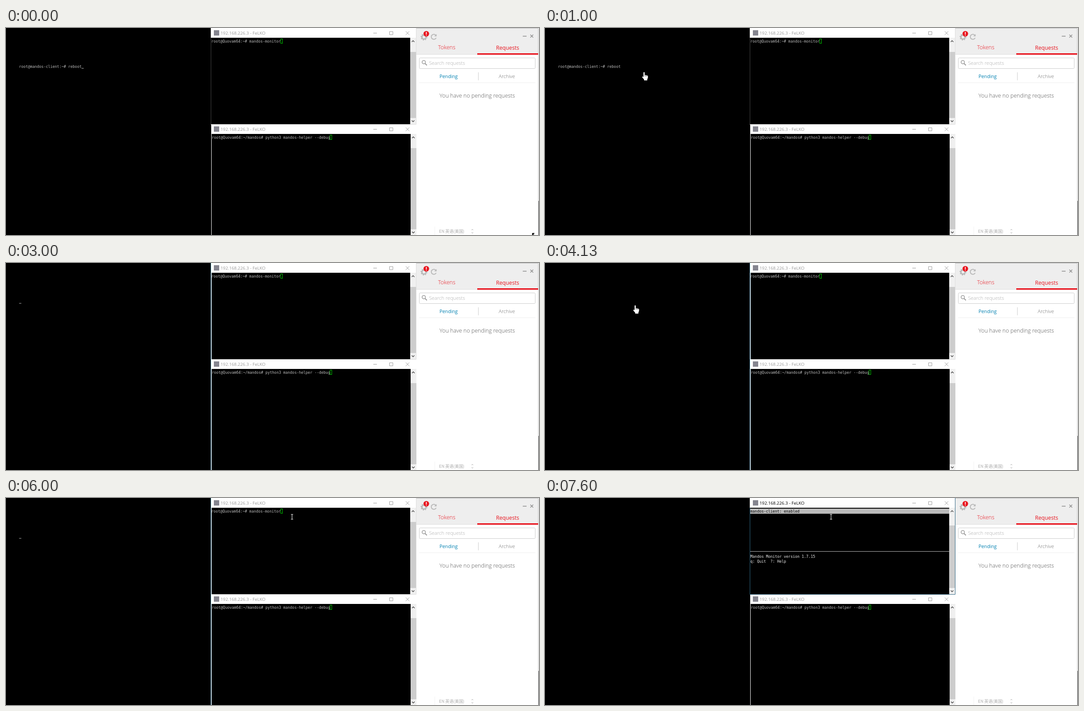
Animation, 1200 px wide and 467 px high, one loop 8000 ms. Source, as an HTML page:

```html
<!DOCTYPE html>
<html lang="en">
<head>
<meta charset="utf-8">
<title>Remote unlock demo</title>
<style>
  html, body { margin: 0; width: 100%; height: 100%; overflow: hidden; background: #000; }
  svg { display: block; width: 1200px; height: 467px; }
  text { white-space: pre; }
  .mono { font: 8.37px "DejaVu Sans Mono", monospace; fill: #bbb; }
  .bright { fill: #eee; }
  .title { font: 9.8px "Open Sans", "Noto Sans", sans-serif; fill: #999; }
  .ui { font: 300 12.5px "Open Sans", "Noto Sans", sans-serif; text-anchor: middle; }
  .small { font-size: 11.2px; }
  .lang { font: 300 9.2px "Noto Sans CJK SC", "Noto Sans CJK", sans-serif; fill: #aaa; }
  .btn { fill: none; stroke: #999; }
  .arrow { fill: none; stroke: #444; stroke-width: 1.4; }
  .edge { fill: none; stroke: #ddd; }
  .side { stroke: #444; }
  .caret { fill: none; stroke: #00c800; }
  .active .title { fill: #000; }
  .active .btn { stroke: #000; }
  .active .edge { stroke: #2f6683; }
  .active .caret { fill: #00d000; }
</style>
</head>
<body>
<svg viewBox="0 0 1200 467">
  <defs>
    <g id="buttons" class="btn">
      <path d="M827 11.5h8M863.5 8h7.5v7h-7.5zM900 7.5l8 8m0-8l-8 8"/>
    </g>
    <path id="up" class="arrow" d="M-3 1.5L0-1.5L3 1.5"/>
    <path id="down" class="arrow" d="M-3-1.5L0 1.5L3-1.5"/>
  </defs>
  <rect width="1200" height="467"/>

  <!-- client console -->
  <text id="reboot" class="mono" x="29.3" y="90">root@mandos-client:~# reboot</text>
  <rect id="blink" y="90.5" width="5" height="1" fill="#bbb"/>

  <!-- lower terminal -->
  <g>
    <rect x="462" y="217" width="462" height="250" fill="#fff"/>
    <rect x="463" y="239" width="448" height="228"/>
    <rect x="468" y="222" width="12" height="12" fill="#85858f"/>
    <text class="title" x="483" y="232">192.168.226.3 - FeLKO</text>
    <use href="#buttons" y="217"/>
    <text class="mono" x="463.2" y="249.7">root@Quovam64:~/mandos# python3 mandos-helper --debug</text>
    <rect class="caret" x="729.5" y="241.5" width="4" height="10"/>
    <rect x="911" y="239" width="13" height="228" fill="#f0f0f0"/>
    <rect x="911" y="271" width="13" height="183" fill="#cdcdcd"/>
    <use href="#up" x="917" y="247"/>
    <use href="#down" x="917" y="461"/>
  </g>

  <!-- upper terminal -->
  <g id="monitor">
    <rect x="461" width="463" height="218" fill="#fff"/>
    <rect x="462" y="22" width="448" height="195"/>
    <rect x="468" y="5" width="12" height="12" fill="#85858f"/>
    <text class="title" x="483" y="15">192.168.226.3 - FeLKO</text>
    <use href="#buttons"/>
    <g id="prompt">
      <text class="mono" x="462.3" y="32.7">root@Quovam64:~# mandos-monitor</text>
      <rect class="caret" x="618.5" y="24.5" width="4" height="10"/>
    </g>
    <g id="status">
      <rect x="462" y="24" width="448" height="11.5" fill="#bbb"/>
      <text class="mono" x="462.3" y="32.7" style="fill:#000">mandos-client: enabled</text>
      <rect x="462" y="120" width="448" height="1" fill="#bbb"/>
      <text class="mono bright" x="462.3" y="134.5">Mandos Monitor version 1.7.15</text>
      <text class="mono bright" x="462.3" y="145.7">q: Quit  ?: Help</text>
    </g>
    <rect x="910" y="22" width="13" height="195" fill="#f0f0f0"/>
    <rect id="thumb" x="910" width="13" fill="#cdcdcd"/>
    <use href="#up" x="916.5" y="30"/>
    <use href="#down" x="916.5" y="210"/>
    <path class="edge" d="M461 217.5H923.5V0"/>
    <path class="edge side" d="M461.5 22V217"/>
  </g>
  <g id="focus">
    <rect x="461" width="1" height="467" fill="#8fcdf0"/>
    <rect x="462" width="1" height="467" fill="#fff"/>
  </g>

  <!-- token panel -->
  <g>
    <rect x="924" width="276" height="467" fill="#fff"/>
    <rect x="924" y="1" width="274" height="59" fill="#eee"/>
    <path d="M924 59.5H1198" stroke="#ddd"/>
    <path d="M924 .5H1198.5V467" fill="none" stroke="#bbb"/>
    <path d="M1199.5 390V467" stroke="#555"/>
    <g fill="none" stroke="#b8b8b8">
      <circle cx="941" cy="20.5" r="4.6" stroke-width="3"/>
      <circle cx="941" cy="20.5" r="6.6" stroke-width="2.2" stroke-dasharray="2.6 2.58"/>
      <path d="M967.4 16A5.7 5.7 0 1 0 968.4 22.3" stroke-width="2"/>
      <path d="M969.5 13.5v5.3h-5.3z" fill="#b8b8b8" stroke="none"/>
    </g>
    <circle cx="946.3" cy="13" r="6.3" fill="#e8151f"/>
    <path d="M946.3 9v5M946.3 15.2v1.7" stroke="#fff" stroke-width="1.8"/>
    <path d="M1163.5 18.5h8.5M1180.5 15l6.5 6.5m0-6.5l-6.5 6.5" stroke="#888" stroke-width="1.4"/>
    <text class="ui" x="992.3" y="48.3" fill="#e8151f">Tokens</text>
    <text class="ui" x="1129.3" y="48.5" fill="#e8151f" style="font-weight:400;font-size:12.2px">Requests</text>
    <rect x="1061" y="57" width="137" height="3.3" fill="#e8151f"/>
    <rect x="930.5" y="67.5" width="261" height="24" rx="2" fill="#fff" stroke="#ccc"/>
    <g fill="none" stroke="#999">
      <circle cx="940.6" cy="77" r="3.8" stroke-width="1.5"/>
      <path d="M943.4 80l4.2 4.2" stroke-width="2"/>
    </g>
    <text class="ui small" x="993" y="83.4" fill="#aaa">Search requests</text>
    <text class="ui small" x="996.5" y="113" fill="#0080b0" style="font-weight:400;font-size:10.8px">Pending</text>
    <text class="ui small" x="1127.5" y="113" fill="#666">Archive</text>
    <path d="M1063.5 100V118" stroke="#ccc"/>
    <path d="M930 123.5H1192" stroke="#eee"/>
    <text class="ui" x="1061" y="156.5" fill="#555">You have no pending requests</text>
    <path d="M965.5 448V467" stroke="#f2f2f2"/>
    <text class="lang" x="975" y="461.5">EN</text>
    <text class="lang" x="989" y="461.5">英语(美国)</text>
    <path d="M1048 456l2-2 2 2M1048 461l2 2 2-2" fill="none" stroke="#aaa"/>
  </g>

  <!-- pointers, each with its hot spot at 0,0 -->
  <g id="pointers">
    <g data-kind="hand" transform="translate(-4.8)">
      <path d="M3.5 1.3a1.3 1.3 0 0 1 2.6 0V6.2l6 1.3q1.4.4 1.4 1.9v3.2l-1.5 3.9v2.3H4.9v-2L.7 11.8q-.6-1.5.7-1.9 1-.2 2.1 1.3z" fill="#fff"/>
      <path d="M6.2 6.5v3.3M8.6 7v3M11 7.5v2.7" stroke="#000" stroke-width=".6"/>
    </g>
    <path data-kind="beam" d="M-2.5-5.5h2L0-5l.5-.5h2M0-5V5M-2.5 5.5h2L0 5l.5.5h2" fill="none" stroke="#fff" stroke-width="1.1"/>
    <path data-kind="arrow" d="M0 0V12.5l3-2.7 2 4.6 2-.9-2-4.4h4z" fill="#fff" stroke="#000" stroke-width=".8"/>
    <path data-kind="resize" d="M-6-1.5V-6h4.5zM6 1.5V6H1.5zM-5-5L5 5" fill="#000" stroke="#000"/>
  </g>
</svg>
<script>
  const LOOP = 8000, FPS = 15;
  const $ = id => document.getElementById(id);
  const kinds = [...$('pointers').children];

  // pointer trips: [time, x, y]
  const trips = [
    [[0, 1191, 469], [200, 1030, 390], [400, 650, 275], [600, 330, 135], [733, 247, 99],
     [867, 236, 98], [1000, 223, 99.5], [1133, 219, 99.5], [1267, 219, 99.5]],
    [[3800, 219, 100], [3933, 212, 102], [4133, 203, 95.5], [4333, 222, 92], [4467, 264, 89],
     [4600, 362, 94], [4667, 467, 91], [4733, 556, 83], [4867, 558, 80], [5200, 573, 68],
     [5467, 596, 50], [5667, 614, 42], [5867, 642, 42.5], [5933, 644, 42.5], [LOOP, 644, 42.5]]
  ];

  function pointerAt(t) {
    const trip = trips.find(p => t >= p[0][0] && t < p[p.length - 1][0]);
    if (!trip) return null;
    const i = trip.findIndex(k => k[0] > t);
    const [t0, x0, y0] = trip[i - 1], [t1, x1, y1] = trip[i];
    const u = (t - t0) / (t1 - t0);
    return [x0 + (x1 - x0) * u, y0 + (y1 - y0) * u];
  }

  function kindAt(x, y) {
    if (y > 460 && x > 1180) return 'resize';
    if (x < 463) return 'hand';
    const inTerminal = x < 910 && (y > 240 || (y > 23 && y < 217));
    return inTerminal ? 'beam' : 'arrow';
  }

  function blinkOn(t) {
    if (t >= 7600) return false;
    if (t >= 4670) return Math.floor((t - 4670) / 200) % 2 === 0;
    const odd = Math.floor(t / 200) % 2 === 1;
    return t < 2670 ? !odd : odd;
  }

  const show = (el, on) => el.setAttribute('visibility', on ? 'visible' : 'hidden');

  function draw(t) {
    const cleared = t >= 2670, running = t >= 7200;
    show($('reboot'), !cleared);
    $('blink').setAttribute('x', cleared ? 29.5 : 170);
    show($('blink'), blinkOn(t));
    show($('focus'), t >= 1270 && t < 6070);
    $('monitor').setAttribute('class', t >= 6070 ? 'active' : '');
    show($('prompt'), !running);
    show($('status'), running);
    const top = running ? 62 : 54;
    $('thumb').setAttribute('y', top);
    $('thumb').setAttribute('height', 203 - top);

    const step = Math.floor((t + 4) * FPS / 1000) * 1000 / FPS;
    const at = pointerAt(step);
    const kind = at && kindAt(...at);
    kinds.forEach(k => show(k, k.dataset.kind === kind));
    if (at) $('pointers').setAttribute('transform', `translate(${at})`);
  }

  function tick() {
    draw(performance.now() % LOOP);
    requestAnimationFrame(tick);
  }
  tick();
</script>
</body>
</html>
```
